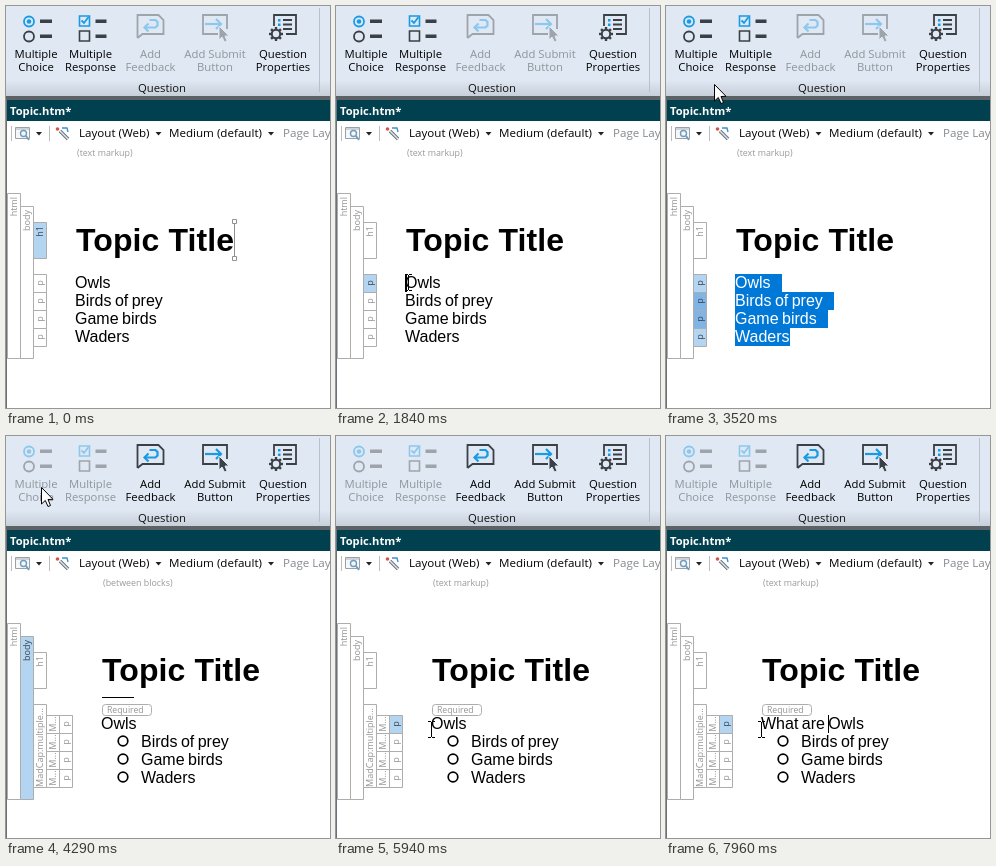
Animation, 324 px wide and 402 px high, one loop 8 s. Source, as an HTML page with a canvas:

```html
<!DOCTYPE html>
<html lang="en">
<head>
<meta charset="utf-8">
<title>Topic editor</title>
<style>
html, body { margin: 0; width: 100%; height: 100%; overflow: hidden; background: #fff; }
canvas { display: block; width: 324px; height: 402px; }
</style>
</head>
<body>
<canvas id="stage"></canvas>
<script>
const W = 324, H = 402, LOOP = 8000, TICK = 130;
const UI = '"Open Sans", "Noto Sans", sans-serif';
const DOC = '"Liberation Sans", Arial, sans-serif';
const INK = '#3b4046', BLUE = '#189be4', PALE = '#b3d5f2', MID = '#80b4e4', SELECT = '#0078d7';
const TOP = 268, ROW = 18;
const APPEAR = 660, CLICK = 1840, DRAG = 2220, DROP = 2870, CONVERT = 4290, FOCUS = 5400;
const birds = ['Owls', 'Birds of prey', 'Game birds', 'Waders'];

// Turning points of the pointer: time, x, y
const path = [
  [APPEAR, 159, 406], [1310, 77, 288], [1830, 72, 276], [2090, 76, 277],
  [DRAG, 96, 279], [2480, 118, 315], [DROP, 130, 332],
  [3260, 160, 232], [3520, 48, 78], [3910, 35, 51], [4300, 35, 51],
  [4690, 102, 274], [4950, 97, 302], [5080, 95, 293]
];

const canvas = document.getElementById('stage');
const ratio = window.devicePixelRatio || 1;
canvas.width = W * ratio;
canvas.height = H * ratio;
const ctx = canvas.getContext('2d');

const during = (t, from, to) => t >= from && t < to;

// The pointer is sampled once per tick, so it moves in small jumps
function pointerAt(t) {
  const s = Math.floor((t - 10) / TICK) * TICK + 10;
  const next = path.findIndex(p => p[0] > s);
  if (next < 0) return path.at(-1).slice(1);
  const [t0, x0, y0] = path[next - 1], [t1, x1, y1] = path[next];
  const k = (s - t0) / (t1 - t0);
  return [x0 + (x1 - x0) * k, y0 + (y1 - y0) * k].map(Math.round);
}

function typedAt(t) {
  const burst = (word, start) =>
    word.slice(0, Math.max(0, Math.floor((t - start) / TICK) + 1));
  return burst('What ', 6620) + burst('are ', 7430);
}

function rect(x, y, w, h, color) {
  ctx.fillStyle = color;
  ctx.fillRect(x, y, w, h);
}

function text(str, x, y, size, color, { font = UI, weight = 400, align = 'left' } = {}) {
  ctx.font = `${weight} ${size}px ${font}`;
  ctx.textAlign = align;
  ctx.fillStyle = color;
  ctx.fillText(str, x, y);
}

// Draws body text and returns where it ends
function doc(str, x, y, color = '#000') {
  ctx.wordSpacing = '-1px';
  text(str, x, y, 16, color, { font: DOC });
  const end = x + ctx.measureText(str).width;
  ctx.wordSpacing = '0px';
  return end;
}

function heading(x) {
  ctx.letterSpacing = '0.1px';
  text('Topic Title', x, 245, 32, '#000', { font: DOC, weight: 700 });
  ctx.letterSpacing = '0px';
}

function trace(pts) {
  ctx.beginPath();
  for (let i = 0; i < pts.length; i += 2) ctx.lineTo(pts[i], pts[i + 1]);
}

function line(color, width, ...pts) {
  trace(pts);
  ctx.strokeStyle = color;
  ctx.lineWidth = width;
  ctx.stroke();
}

function polygon(fill, stroke, ...pts) {
  trace(pts);
  ctx.closePath();
  ctx.fillStyle = fill;
  ctx.fill();
  ctx.strokeStyle = stroke;
  ctx.lineWidth = 1;
  ctx.stroke();
}

function ring(x, y, r, color, width) {
  ctx.strokeStyle = color;
  ctx.lineWidth = width;
  ctx.beginPath();
  ctx.arc(x, y, r, 0, 7);
  ctx.stroke();
}

function dot(x, y, r, color) {
  ctx.fillStyle = color;
  ctx.beginPath();
  ctx.arc(x, y, r, 0, 7);
  ctx.fill();
}

function box(x, y, w, h, color, { r = 0, width = 1, fill = 'transparent' } = {}) {
  ctx.beginPath();
  ctx.roundRect(x, y, w, h, r);
  ctx.fillStyle = fill;
  ctx.fill();
  ctx.strokeStyle = color;
  ctx.lineWidth = width;
  ctx.stroke();
}

// Ribbon icons, drawn around the middle of their button
function choiceIcon(ink, accent) {
  [accent, ink].forEach((color, k) => {
    ring(-7, 15.5 + 15 * k, 5, color, 1.8);
    rect(4, 13.5 + 15 * k, 12, 3.5, ink);
  });
  dot(-7, 15.5, 2.3, accent);
}

function responseIcon(ink, accent) {
  [accent, ink].forEach((color, k) => {
    box(-11, 10 + 15 * k, 10, 10, color, { width: 1.6 });
    rect(5, 13.5 + 15 * k, 11, 3.5, ink);
  });
  line(accent, 1.8, -9, 14.5, -6.5, 17, -2, 11);
}

function feedbackIcon(ink, accent) {
  line(ink, 1.8, -13, 32, -13, 9, 8, 9, 13, 14, 13, 28, -8, 28, -13, 32);
  line(accent, 2.2, -6, 21.5, 5, 21.5, 7, 19.5, 7, 16, 5, 14, -1, 14);
  line(accent, 2.2, -2, 17.5, -6, 21.5, -2, 25.5);
}

function submitIcon(ink, accent) {
  line(ink, 1.8, 3, 28, -12, 28, -12, 9, 12, 9, 12, 23);
  line(accent, 2.2, -10, 18, 6, 18);
  line(accent, 2.2, 1, 13, 6, 18, 1, 23);
  polygon(ink, '#dfe8f3', 4, 20, 4, 34, 7, 31, 9.5, 36, 12, 35, 10, 30, 14, 30);
}

function propertiesIcon(ink, accent) {
  line(ink, 1.8, -9, 20, -9, 9, 13, 9, 13, 28, 3, 28);
  for (let y = 14; y < 25; y += 4.5) {
    rect(-5, y - 1, 2.5, 2.5, accent);
    rect(0, y - 1, 9, 2, ink);
  }
  const x = -7, y = 28;
  dot(x, y, 8, '#dfe8f3');
  for (let a = 0; a < 6.2; a += Math.PI / 4) {
    const c = Math.cos(a), s = Math.sin(a);
    line(ink, 2.4, x + 4 * c, y + 4 * s, x + 7 * c, y + 7 * s);
  }
  ring(x, y, 4.2, ink, 2);
}

const buttons = [
  { x: 30, label: ['Multiple', 'Choice'], icon: choiceIcon, group: 'convert' },
  { x: 84.5, label: ['Multiple', 'Response'], icon: responseIcon, group: 'convert' },
  { x: 144.5, label: ['Add', 'Feedback'], icon: feedbackIcon, group: 'extend' },
  { x: 209, label: ['Add Submit', 'Button'], icon: submitIcon, group: 'extend' },
  { x: 277, label: ['Question', 'Properties'], icon: propertiesIcon }
];

function ribbon(t) {
  const off = t >= CONVERT ? 'convert' : 'extend';
  const shade = ctx.createLinearGradient(0, 74, 0, 91);
  shade.addColorStop(0, '#dfe8f3');
  shade.addColorStop(1, '#c6ced8');
  rect(0, 0, W, 91, shade);
  rect(0, 90, W, 4, '#5d6266');
  if (during(t, 3660, CONVERT)) rect(5, 3, 49, 70, '#cbdff3');
  for (const { x, label, icon, group } of buttons) {
    const disabled = group === off;
    ctx.save();
    ctx.translate(x, 0);
    icon(disabled ? '#9ea4aa' : INK, disabled ? '#8cc8ee' : BLUE);
    label.forEach((s, k) =>
      text(s, 0, 52 + 13 * k, 11.3, disabled ? '#8f959b' : '#000', { align: 'center' }));
    ctx.restore();
  }
  text('Question', 156, 86, 11.3, '#111', { align: 'center' });
  rect(313, 2, 1, 84, '#b7c1cc');
}

function toolbar() {
  rect(0, 94, W, 21, '#00404f');
  text('Topic.htm*', 4, 109, 11.2, '#fff', { weight: 700 });
  for (const x of [5, 43]) rect(x, 120, 1, 15, '#bdbdbd');
  box(9.5, 121.5, 14, 11, '#9aa0a5', { fill: '#f6f7f8' });
  rect(10, 122, 13, 2, '#cfd3d6');
  ring(17.5, 127.5, 3, '#6f9cbd', 1.4);
  line('#6f9cbd', 1.8, 20, 130, 23, 134);
  line('#6c757d', 3.6, 54, 125, 62, 133);
  line('#dfe5ea', 1.4, 54, 125, 62, 133);
  line('#3f8fcb', 1.4, 56, 122, 61, 122, 62, 126);
  dot(51.5, 123, 1.8, '#d5524a');
  text('Layout (Web)', 73, 131, 11.6, '#000');
  text('Medium (default)', 163, 131, 11.6, '#000');
  text('Page Layout', 277, 131, 11.6, '#85898d');
  for (const x of [33, 152.5, 265]) polygon('#222', 'transparent', x - 3, 126, x + 3, 126, x, 129.5);
}

function tag(label, x, top, bottom, fill = '#fff', centered = false) {
  box(x + .5, top + .5, 13, bottom - top, '#adadad', { fill });
  ctx.save();
  ctx.translate(x + 9.5, centered ? (top + bottom) / 2 : top + 4);
  ctx.rotate(-Math.PI / 2);
  text(label, 0, 0, 9, fill === '#fff' ? '#929292' : '#36424d', { align: centered ? 'center' : 'right' });
  ctx.restore();
}

function outline(bottom, bodyFill, headFill) {
  tag('html', 1, 187, bottom);
  tag('body', 14, 200, bottom, bodyFill);
  tag('h1', 27, 216, 252, headFill);
}

function listPage(t) {
  outline(352, '#fff', t < CLICK ? PALE : '#fff');
  text('(text markup)', 71, 150, 8.9, '#999');
  heading(70);

  // The selection runs from the first row to the dragged pointer
  const [px, py] = t < DRAG ? [0, 0] : pointerAt(Math.min(t, DROP));
  const last = Math.floor((py - TOP) / ROW);
  birds.forEach((name, k) => {
    const top = TOP + ROW * k, base = top + 14;
    const lit = k <= last || (k === 0 && t >= CLICK);
    tag('p', 27, top, top + ROW, !lit ? '#fff' : k > 0 && k < last ? MID : PALE, true);
    const end = doc(name, 69, base);
    if (k > last) return;
    const edge = k < last ? end + 11 : Math.min(px - 4, end);
    ctx.save();
    ctx.beginPath();
    ctx.rect(69, top, Math.round(edge) - 69, ROW);
    ctx.clip();
    rect(69, top, W, ROW, SELECT);
    doc(name, 69, base, '#fff');
    ctx.restore();
  });

  if (t < CLICK) {
    rect(228, 216, 1, 36, '#909090');
    for (const y of [213.5, 250.5]) box(226.5, y, 4, 4, '#909090', { fill: '#fff' });
  } else if (t < 2100) {
    rect(69, TOP, 2, ROW, '#000');
  }
}

function questionPage(t) {
  const inside = t >= FOCUS;
  outline(363, inside ? '#fff' : PALE);
  tag('MadCap:multiple...', 27, TOP, 351);
  birds.forEach((name, k) => {
    const top = 279 + ROW * k;
    tag('M...', 40, top, top + ROW, '#fff', true);
    tag('p', 53, top, top + ROW, inside && k === 0 ? PALE : '#fff', true);
    if (k === 0) return;
    ring(117, top + 8, 4.8, '#000', 1.7);
    doc(name, 135, top + 14);
  });
  text(inside ? '(text markup)' : '(between blocks)', 97, 150, 8.9, '#999');
  heading(96);
  box(96.5, 268.5, 49, 11, '#adadad', { r: 3 });
  text('Required', 101, 277, 8.7, '#939393');

  const lead = typedAt(t);
  const x = doc(lead, 95, 293);
  doc('Owls', x, 293);
  if (t < 4850) rect(96, 261, 32, 1, '#000');
  if (during(t, FOCUS, 5940) || lead) rect(Math.round(x), 279, 1, ROW, '#000');
}

function arrow(x, y) {
  polygon('#fff', '#000', x + .5, y + .5, x + .5, y + 17, x + 4.3, y + 13.5, x + 7, y + 19.5,
    x + 9.5, y + 18.5, x + 7, y + 12.5, x + 12, y + 12.3);
}

function beam(x, y) {
  for (const end of [y - 8, y + 8]) {
    rect(x - 3, end, 3, 1, '#000');
    rect(x + 1, end, 3, 1, '#000');
  }
  rect(x, y - 7, 1, 15, '#000');
}

function draw(t) {
  ctx.setTransform(ratio, 0, 0, ratio, 0, 0);
  rect(0, 0, W, H, '#fff');
  ribbon(t);
  toolbar();
  (t < CONVERT ? listPage : questionPage)(t);
  rect(0, 93, 1, H - 93, '#6b7176');
  if (t >= APPEAR) (during(t, 3150, 4700) ? arrow : beam)(...pointerAt(t));
}

function frame() {
  draw(performance.now() % LOOP);
  requestAnimationFrame(frame);
}
frame();
</script>
</body>
</html>
```
